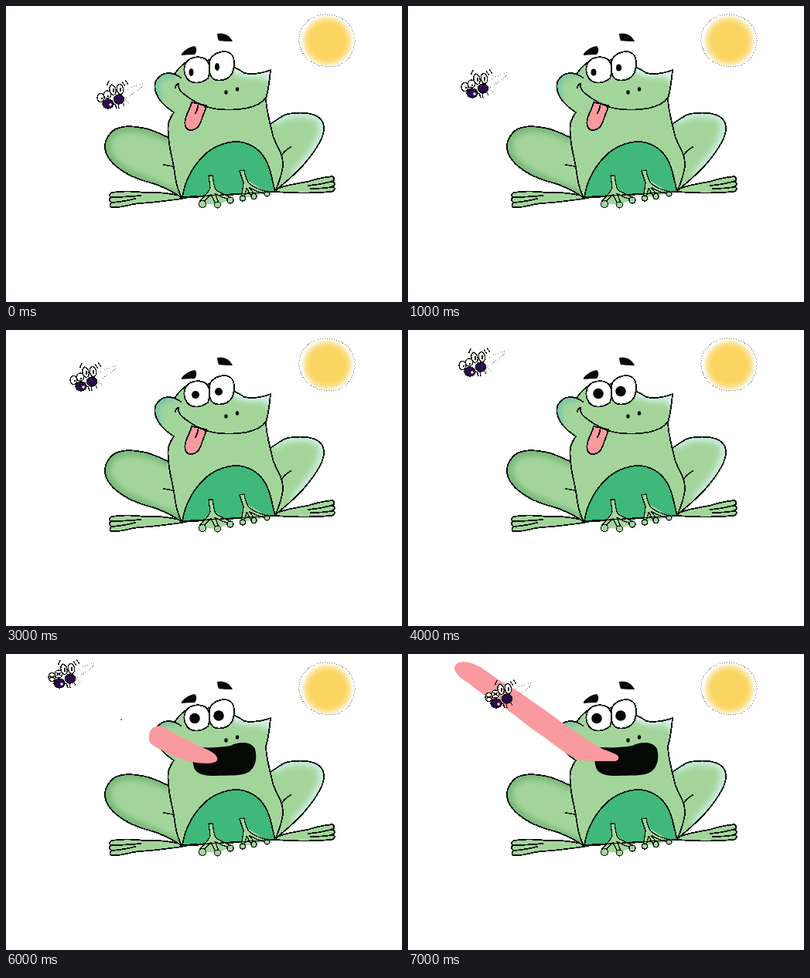
Write an HTML page that moves like this. It is 512 by 384 pixels and loops after 8 s.

```html
<!DOCTYPE html>
<html lang="en">
<head>
<meta charset="utf-8">
<title>Frog and fly</title>
<style>
html, body { margin: 0; width: 100%; height: 100%; overflow: hidden; background: #fff; }
svg { display: block; width: 512px; height: 384px; }
.ink { stroke: #0b120b; stroke-width: 1.8; stroke-linejoin: round; stroke-linecap: round; shape-rendering: crispEdges; }
.thin { stroke-width: 1.3; }
.line { fill: none; }
.skin { fill: #a3d59b; }
.pink { fill: #f99a9e; }
.black { fill: #050805; }
.white { fill: #fff; }
.dots { fill: none; stroke: #777; stroke-width: 1; stroke-dasharray: 1 2; shape-rendering: crispEdges; }
</style>
</head>
<body>
<svg viewBox="0 0 512 384">
  <defs>
    <radialGradient id="sun">
      <stop offset=".66" stop-color="#fbd561"/>
      <stop offset=".82" stop-color="#fbe08e"/>
      <stop offset="1" stop-color="#fffdf8"/>
    </radialGradient>
    <filter id="soft" x="-30%" y="-30%" width="160%" height="160%"><feGaussianBlur stdDeviation="3.500"/></filter>
    <path id="thighL" d="M215 173C204 168 190 160 176 158C161 155 143 155 135 165C126 176 126 188 134 199C144 213 166 224 186 229C202 233 215 241 228 249L220 228Z"/>
    <path id="thighR" d="M342 153C349 149 355 143 364 140C377 138 393 138 402 143C413 149 413 162 407 174C400 188 387 205 375 216C366 225 356 233 348 240L335 215L335 160Z"/>
    <path id="body" d="M228 249C221 239 219 224 217 209C214 192 210 181 210 166C208 152 212 145 217 138C205 130 195 121 193 109C190 96 200 87 211 87L218 88C222 82 226 78 231 74L265 70L293 79C298 80 302 83 308 87C319 89 332 87 342 83C341 95 340 106 336 120C337 139 342 153 345 168C349 181 358 190 358 205C358 218 352 230 348 241Z"/>
    <clipPath id="inL"><use href="#thighL"/></clipPath>
    <clipPath id="inR"><use href="#thighR"/></clipPath>
    <clipPath id="inB"><use href="#body"/></clipPath>
  </defs>

  <circle cx="415.500" cy="45.500" r="34" fill="url(#sun)"/>
  <path class="dots" d="M379 46C377 25 396 10 415 11C437 12 452 27 451 46C450 65 437 79 418 79C398 79 380 65 379 46Z"/>

  <!-- hind legs -->
  <path class="ink skin" d="M228 247C213 243 198 241 179 242C164 240 149 240 137 242C133 244 133 247 136 248C133 250 133 253 137 255C133 257 134 262 139 261C150 262 160 257 172 256C193 255 211 252 228 250Z"/>
  <path class="ink line" d="M136 248Q153 248 174 246M137 255Q151 254 167 250"/>
  <path class="ink skin" d="M348 238C362 232 377 230 390 228C401 224 413 222 422 221C426 223 425 227 420 228C426 228 426 233 422 234C426 236 426 240 420 241C398 243 372 243 348 241Z"/>
  <path class="ink line" d="M420 228Q405 232 391 233M422 235Q408 237 394 237"/>
  <use href="#thighL" class="skin"/>
  <g clip-path="url(#inL)"><path d="M213 172C187 156 145 148 131 170C121 190 139 210 163 221Q198 236 228 249" fill="none" stroke="#79b879" stroke-width="14" filter="url(#soft)"/></g>
  <use href="#thighL" class="ink line"/>
  <use href="#thighR" class="skin"/>
  <g clip-path="url(#inR)"><path d="M346 150C364 136 395 136 407 148C415 166 397 192 372 219" fill="none" stroke="#cceee0" stroke-width="10" filter="url(#soft)"/></g>
  <use href="#thighR" class="ink line"/>

  <!-- body and head -->
  <use href="#body" class="skin"/>
  <g clip-path="url(#inB)" fill="none" filter="url(#soft)">
    <path d="M199 122Q188 104 199 92Q206 87 219 90" stroke="#7bc6a4" stroke-width="10"/>
    <path d="M294 79Q309 91 342 84L340 98" stroke="#d8f3ea" stroke-width="12"/>
  </g>
  <use href="#body" class="ink line"/>
  <path class="ink line" d="M211 87Q220 88 226 93M204 206L216 208M357 193Q361 187 368 183"/>
  <path class="ink" fill="#3fb879" d="M228 248C231 229 240 211 252 198C264 184 282 176 299 176C314 177 325 184 333 195C342 208 344 226 348 241Z"/>

  <!-- front feet -->
  <path class="skin" d="M266 232L252 256L273 258L290 251ZM312 226L306 248L321 247L338 242Z"/>
  <g class="ink skin thin">
    <path d="M262 220L267 220C268 227 269 233 271 238C276 242 283 245 290 248L288 251C281 249 275 246 270 243L275 255L271 257L265 244L254 256L250 253C257 247 262 241 264 236Z"/>
    <circle cx="254" cy="257" r="4.400"/><circle cx="273.500" cy="258" r="4"/><circle cx="290" cy="252" r="4"/>
    <path d="M302 214L308 213C309 220 311 226 314 230C320 235 330 239 338 241L336 244C328 242 320 239 314 235L322 245L318 248L311 236L308 249L304 248C305 241 307 235 307 229Z"/>
    <circle cx="306" cy="249.500" r="3.500"/><circle cx="320.500" cy="247" r="3.500"/><circle cx="337.500" cy="243.500" r="3.500"/>
  </g>
  <path class="ink line thin" d="M228 248L348 241"/>

  <!-- mouths -->
  <g id="smile">
    <path class="ink pink" d="M240 125C238 134 233 140 232 147C230 155 233 161 239 161C247 161 251 154 253 147C255 140 258 136 259 129Z"/>
    <path class="ink line" d="M249 126Q248 134 245 139M219 106Q220 101 223 101Q222 109 231 115C245 126 260 133 277 134C300 136 326 133 336 119"/>
  </g>
  <path id="gape" class="black" d="M250 121C264 122 278 121 290 119C302 113 317 113 322 123C325 135 323 146 314 153C304 159 286 157 270 158C256 158 246 156 243 147C240 136 239 122 250 121Z"/>
  <path id="lick" class="pink" d="M186 101C190 92 200 92 207 96C222 106 239 114 256 122C266 126 275 132 273 138C269 144 248 142 235 139C219 134 202 126 191 119C184 115 184 108 186 101Z"/>
  <path id="reach" class="pink" d="M60 19C60 10 71 9 79 11C92 14 104 24 115 32C131 41 145 50 160 61C174 70 187 80 199 89C213 99 227 108 242 118C250 123 259 126 266 129C273 131 275 137 268 139C249 139 231 140 217 136C200 128 186 114 169 103C151 91 137 77 120 67C104 58 90 47 77 37C69 32 61 26 60 19Z"/>
  <path id="speck" d="M148 84h2v2h-2z" fill="#888"/>

  <!-- face -->
  <g class="black">
    <path d="M227 62C231 57 237 53 244 52C247 54 247 59 244 63Q235 63 227 64Z"/>
    <path d="M273 36C280 34 289 37 293 46Q283 46 275 45Q273 40 273 36Z"/>
    <ellipse cx="284.500" cy="112" rx="2.200" ry="2.700"/><ellipse cx="299" cy="108" rx="2.200" ry="2.700"/>
  </g>
  <path class="ink white" d="M232 75C236 66 250 64 258 69C265 75 264 87 261 94C255 99 244 102 237 97C230 91 229 82 232 75Z"/>
  <path class="ink white" d="M263 76C262 65 273 59 284 59C296 61 296 73 294 83C291 94 281 98 271 96C263 93 262 85 263 76Z"/>
  <ellipse id="pupilL" class="black"/>
  <ellipse id="pupilR" class="black"/>

  <!-- fly -->
  <g id="fly">
    <path class="dots" d="M152 112L162 106L176 100L177 104L160 117L154 120L160 128"/>
    <path class="ink line thin" d="M131 103Q131 99 134 97M134 104L137 101M150 98L154 104M154 96L158 102M141 127L143 133M145 127L146 133M150 124L153 130"/>
    <g class="ink thin" fill="#2c0b4d">
      <ellipse cx="146" cy="121" rx="6.500" ry="6"/>
      <ellipse cx="132" cy="127" rx="7" ry="6"/>
    </g>
    <g class="ink white thin">
      <ellipse cx="138" cy="109" rx="4" ry="6.500" transform="rotate(-15 138 109)"/>
      <ellipse cx="147.500" cy="108" rx="4" ry="6.500" transform="rotate(-10 147 108)"/>
      <path d="M139 107v5M148 106v5"/>
      <ellipse cx="131" cy="115" rx="4.500" ry="5"/>
      <ellipse cx="122.500" cy="119" rx="4.500" ry="5.500"/>
    </g>
    <circle cx="135" cy="128" r="1.700" class="white"/>
    <path id="calm" class="black" d="M123 119h2v2h-2zM131 116h2v2h-2z"/>
    <path id="squint" class="ink line thin" d="M119 117L126 121M119 121L126 117M128 113L134 117M128 117L134 113"/>
  </g>
</svg>
<script>
const $ = id => document.getElementById(id);
const STEP = 1000;
// fly offset, left pupil, right pupil, pupil radii, mouth
const poses = [
  { fly: [0, 0],     l: [239.5, 86], r: [273, 79],   size: [3, 5],     mouth: 'smile' },
  { fly: [-49, -14], l: [240, 86],   r: [272.5, 80], size: [3.5, 4.5], mouth: 'smile' },
  { fly: [-20, -30], l: [245, 86.5], r: [276, 81],   size: [4, 4],     mouth: 'smile' },
  { fly: [-35, -54], l: [245, 84],   r: [275, 80],   size: [5, 5],     mouth: 'smile' },
  { fly: [-52, -73], l: [246, 82.5], r: [275, 79.5], size: [6.8, 6.8], mouth: 'smile' },
  { fly: [-63, -89], l: [244, 83.5], r: [275, 80],   size: [6.8, 6.8], mouth: 'gape' },
  { fly: [-63, -89], l: [244, 83.5], r: [275, 80],   size: [6.8, 6.8], mouth: 'lick' },
  { fly: [-18, -63], l: [244, 83.5], r: [275, 80],   size: [6.8, 6.8], mouth: 'reach' }
];

const show = (id, on) => $(id).setAttribute('visibility', on ? 'visible' : 'hidden');

function pupil(id, [cx, cy], [rx, ry]) {
  for (const [key, value] of Object.entries({ cx, cy, rx, ry })) $(id).setAttribute(key, value);
}

function draw(pose) {
  const { fly, l, r, size, mouth } = pose;
  const hunted = mouth === 'lick' || mouth === 'reach';
  $('fly').setAttribute('transform', `translate(${fly})`);
  pupil('pupilL', l, size);
  pupil('pupilR', r, size);
  show('smile', mouth === 'smile');
  show('gape', mouth !== 'smile');
  show('lick', mouth === 'lick');
  show('speck', mouth === 'lick');
  show('reach', mouth === 'reach');
  show('calm', !hunted);
  show('squint', hunted);
}

const start = performance.now();
let shown = -1;
function tick() {
  const i = Math.floor((performance.now() - start) / STEP) % poses.length;
  if (i !== shown) draw(poses[shown = i]);
  requestAnimationFrame(tick);
}
tick();
</script>
</body>
</html>
```
